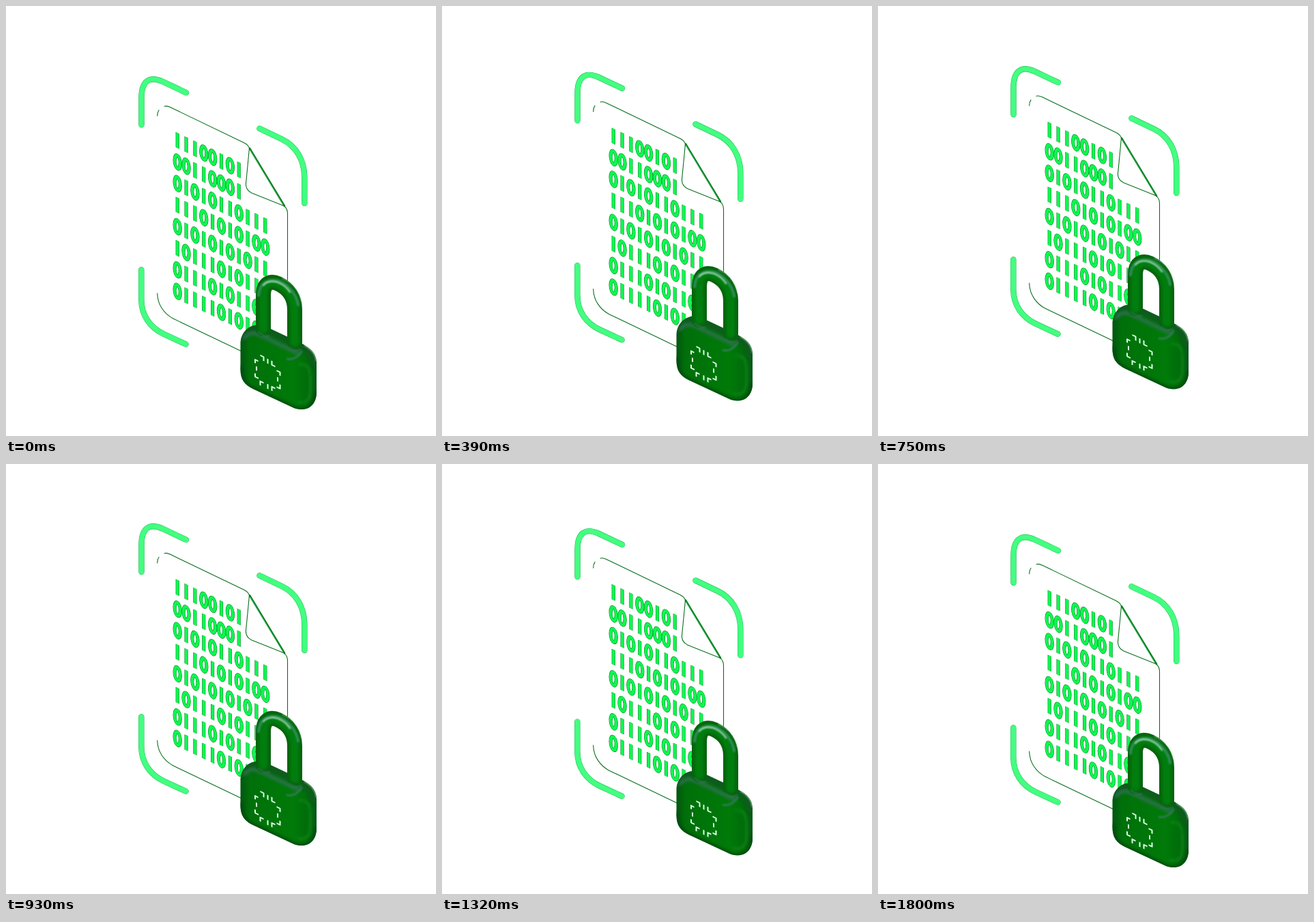
An HTML page that plays this animation: 630x630 px, repeating every 1.83 s.

```html
<!DOCTYPE html>
<html lang="en">
<head>
<meta charset="utf-8">
<title>Locked document</title>
<style>
  html, body { margin: 0; width: 100%; height: 100%; overflow: hidden; background: #fff; }
  svg { display: block; width: 100%; height: 100%; fill: none; stroke-linecap: round; stroke-linejoin: round; }

  /* One cosine wave in 30 ms steps of 6 degrees; the last step repeats the rest pose. */
  @property --turn { syntax: "<angle>"; inherits: false; initial-value: 0deg; }
  .float {
    transform: translateY(calc(var(--rise) * (1 - cos(var(--turn))) / 2));
    animation: turn 1830ms -3ms steps(61) infinite;
  }
  .page { --rise: -16px; }
  .lock { --rise: -32px; }
  @keyframes turn { from { --turn: 0deg; } to { --turn: 366deg; } }

  .edge { stroke: #1ba748; stroke-width: 8.4; }
  .bar { stroke: #42ff80; stroke-width: 7.6; }
  .sheet { stroke: #08701c; stroke-width: 1.1; }
  .rim { stroke: #04701a; stroke-width: 5.1; }
  .ink { stroke: #0cf84e; stroke-width: 4.2; }
  .digit { stroke-linecap: butt; }
  .chip { stroke: #dcffe8; stroke-width: 2; stroke-linecap: butt; }
</style>
</head>
<body>
<svg viewBox="0 0 630 630">
  <defs>
    <path id="corners" d="M198.500 174V134C198.500 109 211 102.500 229 110.500L264 127
      M371.500 179.500L404 195C425 205 437.300 226 437.300 251V289
      M198.300 386.500V430C198.300 453 211 471 231 480.500L263.500 495.500"/>
    <path id="shackle" d="M377 473V424C377 405 388 402 399 407C414 414 423 428 423 445V493"/>
    <path id="body" d="M343.500 495C343.500 478 358 462 380 469.500L432 494C448 502 455 510 455 524V566
      C455 584 442 596 422 589L362 561C350 555 343.500 548 343.500 532Z"/>
    <clipPath id="inBody"><use href="#body"/></clipPath>
    <linearGradient id="front" x1="0" y1="0" x2="1" y2="0">
      <stop offset="0" stop-color="#045510"/>
      <stop offset=".12" stop-color="#00700a"/>
      <stop offset=".7" stop-color="#007a08"/>
      <stop offset=".9" stop-color="#006a0b"/>
      <stop offset="1" stop-color="#08571a"/>
    </linearGradient>
    <filter id="soft" x="-30%" y="-30%" width="160%" height="160%"><feGaussianBlur stdDeviation="2.2"/></filter>
    <filter id="fine" x="-30%" y="-30%" width="160%" height="160%"><feGaussianBlur stdDeviation="1.2"/></filter>
  </defs>

  <g class="float page">
    <use href="#corners" class="edge"/>
    <use href="#corners" class="bar"/>
    <g class="sheet">
      <path d="M221.700 161C221.700 157 222.500 154.500 224 152.500M232 147C235 146 238 147 241 148.500
        L349 200.500C353 202.500 355 204.500 356.500 208C355 224 353 246 351.500 260
        C351 267 354 271 360 274L407.500 293C411 296 412.500 299 412.500 304V412"/>
      <path d="M221.700 421C222 438 232 451 245 458L360 513"/>
    </g>
    <path d="M357 208.500L408 293" stroke="#087a20" stroke-width="2.6"/>
    <path d="M358 211L406 291" stroke="#2fd860" stroke-width=".6"/>
    <g id="digits" class="digit" transform="matrix(1 .478 0 1 251.200 197)"></g>
  </g>

  <g class="float lock">
    <use href="#body" fill="url(#front)"/>
    <g clip-path="url(#inBody)">
      <path d="M342 480C354 460 372 464 388 471L432 492C446 499 456 506 456 518" stroke="#0a5c1c" stroke-width="24" filter="url(#soft)"/>
      <path d="M350 486C356 477 364 478 376 484L428 509" stroke="#2f7050" stroke-width="5" filter="url(#soft)"/>
      <path d="M412 517C420 519 428 514 433 506" stroke="#2f7a52" stroke-width="3" filter="url(#fine)"/>
      <path d="M430 525C445 524 446 535 446 550V564C446 578 438 584 426 580" stroke="#0a8018" stroke-width="4" filter="url(#soft)"/>
      <path d="M344 530C344 548 350 555 362 561L422 589C442 596 455 584 455 566" stroke="#064c10" stroke-width="6" filter="url(#soft)"/>
      <path d="M438 497C449 503 454 510 455 520" stroke="#d5eedd" stroke-width="1.6" filter="url(#fine)"/>
    </g>

    <use href="#shackle" stroke="#06620f" stroke-width="22"/>
    <use href="#shackle" stroke="#007e0b" stroke-width="13" filter="url(#soft)"/>
    <path d="M370 424C371 407 383 399 400 403C415 409 426 424 428 438" stroke="#2f8c55" stroke-width="4" filter="url(#fine)"/>
    <path d="M377 409C382 403 391 402 399 405C406 408 412 413 416 419" stroke="#a8dcb9" stroke-width="2.2" filter="url(#fine)"/>
    <path d="M405 399C420 405 431 418 433 432" stroke="#bfe5ca" stroke-width="1" filter="url(#fine)"/>
    <path d="M370 478C374 482 380 484 386 484M415 500C419 505 427 506 432 503" stroke="#2f7450" stroke-width="2" filter="url(#fine)"/>

    <path class="chip" transform="matrix(1 .478 0 1 383.500 538)" d="M-11 -21H-6V-15M0 -21V-14M6 -21V-15H11
      M-18.500 -6V-11H-14M-16.500 -2V4M-18.500 9V14H-13.500
      M-11 23V17H-6M0 16V23M6 23V17H11
      M13 -10H18V-5M14.500 -1V5M13 14H18V8"/>
  </g>
</svg>
<script>
  const rows = [
    '11100101', '00110001', '01010110111', '11101010100',
    '01010101011', '1011101011', '0111010110', '0111101010'
  ];
  const stepX = 12.86, stepY = 31.6;

  function glyph(bit, x, y, style) {
    return bit === '0'
      ? `<ellipse class="${style}" cx="${x}" cy="${y}" rx="4.1" ry="9.6"/>`
      : `<path class="${style}" d="M${x} ${y - 11}v22"/>`;
  }

  document.getElementById('digits').innerHTML = rows.map((row, r) =>
    [...row].map((bit, c) =>
      ['rim', 'ink'].map(style => glyph(bit, c * stepX, r * stepY, style)).join('')
    ).join('')
  ).join('');
</script>
</body>
</html>
```
